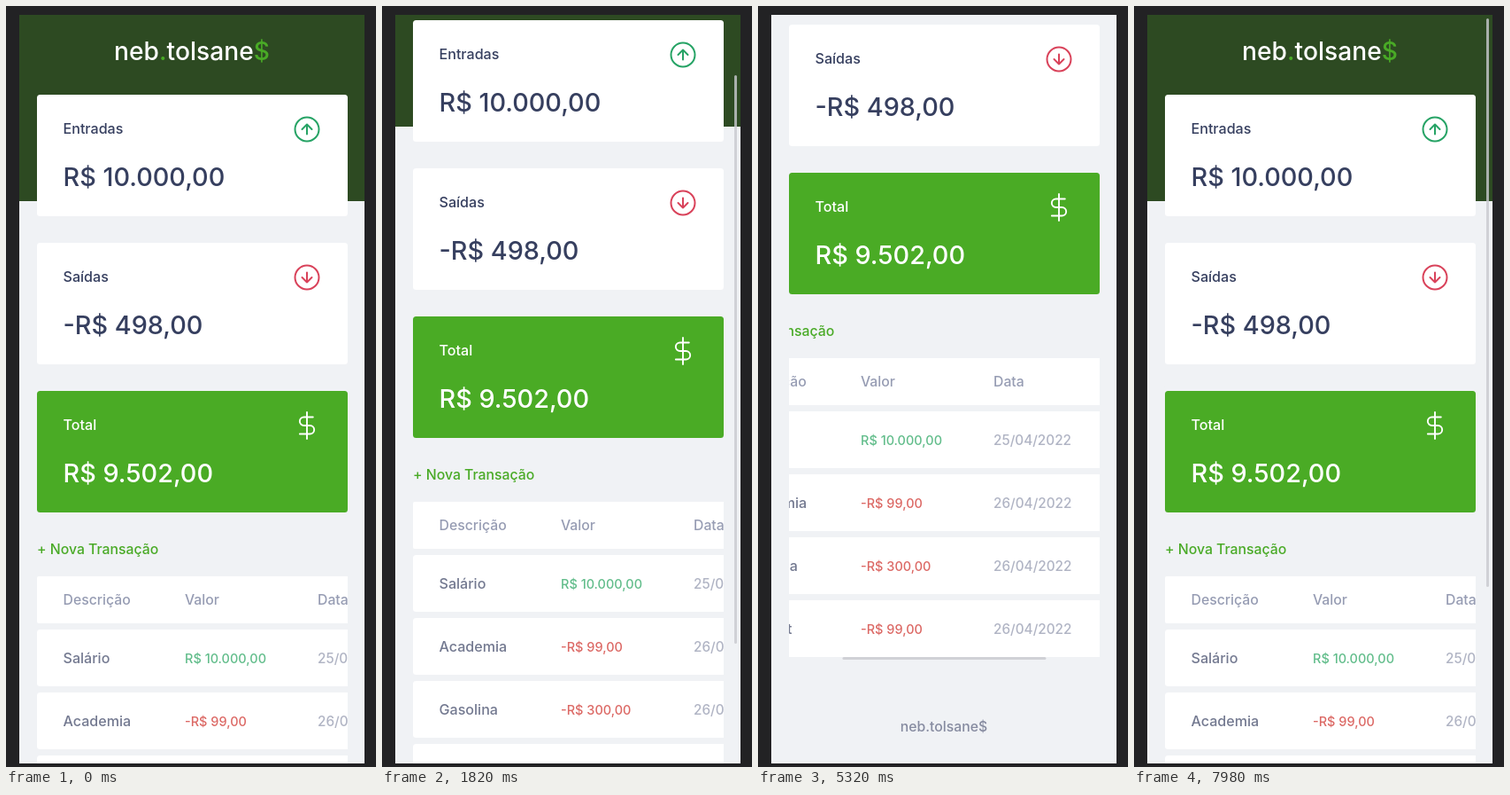
Animation, 418 px wide and 858 px high, one loop 8000 ms. Source, as an HTML page:

```html
<!DOCTYPE html>
<html lang="pt-BR">
<head>
<meta charset="utf-8">
<style>
  html, body { margin: 0; width: 100%; height: 100%; overflow: hidden; background: #222224; }
  svg { display: block; width: 418px; height: 858px; }
  text { font: 450 15.8px Inter, "Open Sans", sans-serif; white-space: pre; }
  .label { font-size: 16.1px; fill: #363f5f; }
  .amount { font-size: 28.8px; fill: #363f5f; }
  .total { fill: #fff; font-weight: 500; }
  .logo { font-size: 28.2px; font-weight: 500; fill: #fff; }
  .accent { fill: #49aa26; }
  .head { fill: #969cb3; }
  .name { font-size: 16.1px; fill: #737990; }
  .income, .expense { font-size: 14.5px; }
  .income { fill: #62bd8b; }
  .expense { fill: #dc6965; }
  .date { font-size: 15.3px; fill: #b0b4c4; }
  .foot { fill: #868ba0; }
  .icon { fill: none; stroke-width: 2; stroke-linecap: round; stroke-linejoin: round; }
  .thumb { fill: #c8cacf; fill-opacity: .8; }
</style>
</head>
<body>
<svg viewBox="0 0 418 858">
  <defs>
    <clipPath id="screen"><rect x="15" y="10" width="390" height="844"/></clipPath>
    <clipPath id="tableBox"><rect x="35" y="590" width="351" height="400"/></clipPath>
  </defs>
  <rect width="418" height="858" fill="#222224"/>
  <g clip-path="url(#screen)">
    <rect x="15" y="10" width="390" height="844" fill="#f0f2f5"/>
    <g id="page"></g>
    <rect id="barY" class="thumb" x="398" width="3" height="641" rx="1.5"/>
  </g>
</svg>
<script>
const LOOP = 8000, STEP = 70, LINGER = 420;
const $ = id => document.getElementById(id);
const text = (x, y, str, cls, extra = '') => `<text x="${x}" y="${y}" class="${cls}" ${extra}>${str}</text>`;
const box = (x, y, w, h, fill = '#fff', r = 3.5) =>
  `<rect x="${x}" y="${y}" width="${w}" height="${h}" rx="${r}" fill="${fill}"/>`;

const arrow = (y, color, turn) =>
  `<g class="icon" stroke="${color}" transform="translate(340 ${y}) rotate(${turn})">
    <circle r="13.5"/><path d="M0 5.5V-5.5M-5.5 0L0 -5.5L5.5 0"/></g>`;
const dollar = y =>
  `<g class="icon" stroke="#fff" style="stroke-width:1.4" transform="translate(340 ${y}) scale(1.36) translate(-12 -12)">
    <path d="M12 1V23M17 5H9.5a3.5 3.5 0 0 0 0 7h5a3.5 3.5 0 0 1 0 7H6"/></g>`;
const minus = y =>
  `<g class="icon" stroke="#e2717f" style="stroke-width:2.5" transform="translate(512.5 ${y})">
    <circle r="12.5"/><path d="M-6 0H6"/></g>`;

const card = (y, label, amount, icon, isTotal) => {
  const tone = isTotal ? ' total' : '';
  return box(35, y, 351, 137, isTotal ? '#4aab25' : '#fff')
    + text(64.5, y + 44, label, 'label' + tone)
    + text(64.5, y + 103, amount, 'amount' + tone) + icon;
};

const row = ([name, value, date], i) => {
  const y = 703 + i * 71;
  return box(35, y, 522, 64)
    + text(64.5, y + 38, name, 'name')
    + text(202, y + 38, value, value[0] === '-' ? 'expense' : 'income')
    + text(352, y + 38, date, 'date') + minus(y + 30);
};

const rows = [
  ['Salário', 'R$ 10.000,00', '25/04/2022'],
  ['Academia', '-R$ 99,00', '26/04/2022'],
  ['Gasolina', '-R$ 300,00', '26/04/2022'],
  ['Internet', '-R$ 99,00', '26/04/2022']
];

$('page').innerHTML =
  box(15, 10, 390, 210, '#2d4a22', 0)
  + text(210, 61, 'neb<tspan class="accent">.</tspan>tolsane<tspan class="accent">$</tspan>', 'logo', 'text-anchor="middle"')
  + card(100, 'Entradas', 'R$ 10.000,00', arrow(139, '#26a365', 0))
  + card(267, 'Saídas', '-R$ 498,00', arrow(306, '#d9425a', 180))
  + card(434, 'Total', 'R$ 9.502,00', dollar(473), true)
  + `<g clip-path="url(#tableBox)"><g id="table">`
  + text(35, 618, '+ Nova Transação', 'accent')
  + box(35, 643, 522, 53, '#fff', 2)
  + text(64.5, 675, 'Descrição', 'head') + text(202, 675, 'Valor', 'head') + text(352, 675, 'Data', 'head')
  + rows.map(row).join('')
  + `</g></g><rect id="barX" class="thumb" y="980" width="230" height="3" rx="1.5"/>`
  + text(210, 1064, 'neb.tolsane$', 'foot', 'text-anchor="middle"');

const easeIn = u => u ** 1.55;
const easeOut = u => 1 - (1 - u) ** 2;
const easeInOut = u => u < .5 ? (2 * u) ** 2.37 / 2 : 1 - (2 - 2 * u) ** 2.37 / 2;

// Each swipe adds its distance to the scroll offset.
const swipe = (start, end, distance, ease) => ({ start, end, distance, ease });
const PAGE_END = 246, TABLE_END = 171, DRAG = 103;
const pageSwipes = [
  swipe(840, 1960, DRAG, easeIn),
  swipe(2030, 2310, PAGE_END - DRAG, easeInOut),
  swipe(7630, 7980, -PAGE_END, easeInOut)
];
const tableSwipes = [
  swipe(4410, 4690, TABLE_END, easeOut),
  swipe(5180, 5460, -TABLE_END, easeInOut),
  swipe(5880, 6230, TABLE_END, easeIn),
  swipe(6580, 7000, -TABLE_END, easeInOut)
];

const progress = (t, s) => Math.min(1, Math.max(0, (t - s.start) / (s.end - s.start)));
const offset = (swipes, t) =>
  Math.round(swipes.reduce((sum, s) => sum + s.distance * s.ease(progress(t, s)), 0));

function placeBar(bar, axis, position, swipes, t) {
  const visible = swipes.some(s => t > s.start && t < s.end + LINGER);
  bar.setAttribute(axis, position);
  bar.setAttribute('visibility', visible ? 'visible' : 'hidden');
}

function render(time) {
  const t = Math.floor(time % LOOP / STEP) * STEP;
  const y = offset(pageSwipes, t), x = offset(tableSwipes, t);
  $('page').setAttribute('transform', `translate(0 ${-y})`);
  $('table').setAttribute('transform', `translate(${-x} 0)`);
  placeBar($('barY'), 'y', 14 + y * 0.762, pageSwipes, t);
  placeBar($('barX'), 'x', 37.5 + x * 0.674, tableSwipes, t);
}

const start = performance.now();
function tick() {
  render(performance.now() - start);
  requestAnimationFrame(tick);
}
tick();
</script>
</body>
</html>
```
